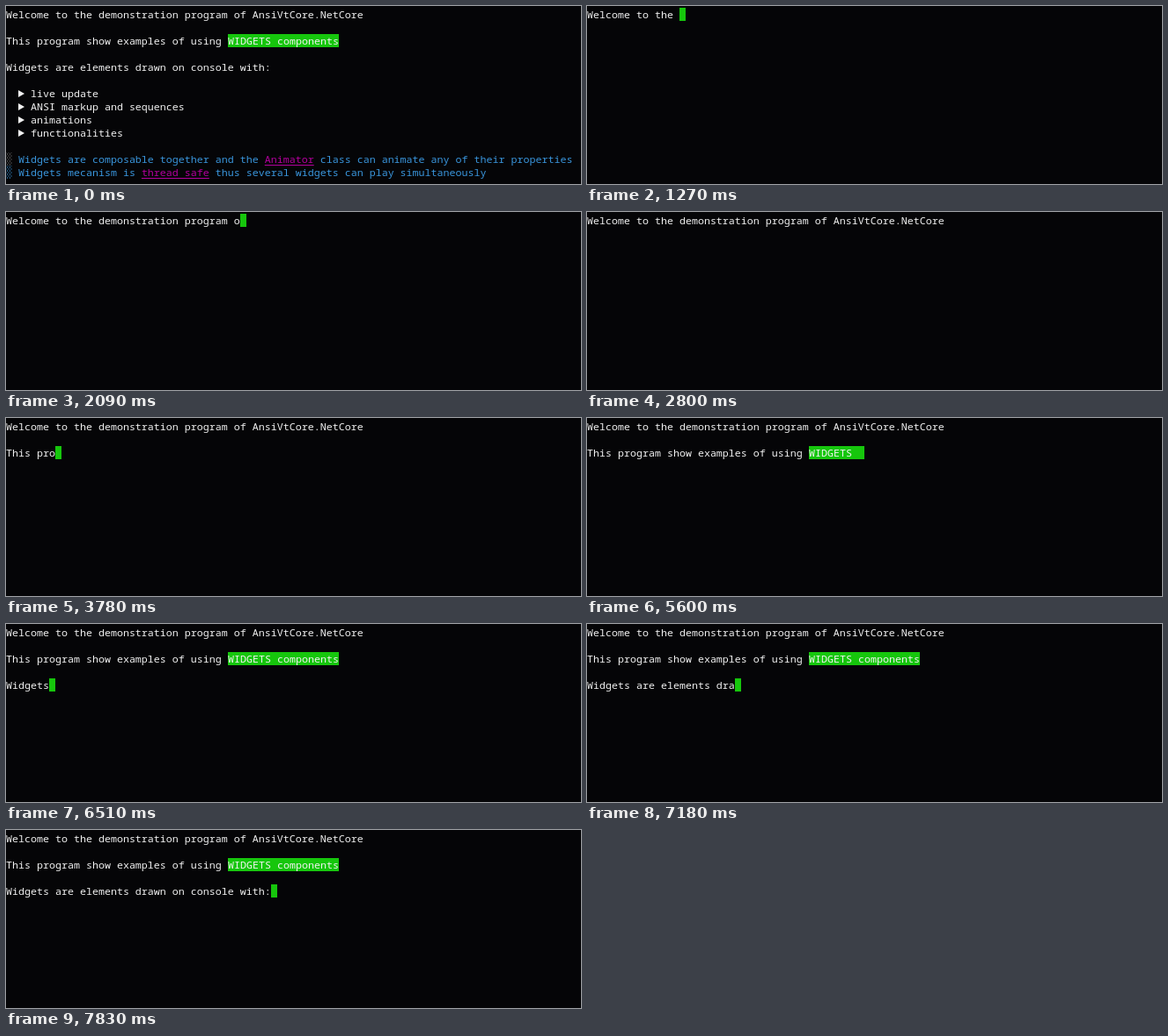
Recreate the animation shown at these times as an HTML page. Size 653 by 203 pixels, loop 8000 ms.

```html
<!DOCTYPE html>
<html lang="en">
<head>
<meta charset="utf-8">
<title>Console widgets demo</title>
<style>
  html, body { margin: 0; width: 100%; height: 100%; overflow: hidden; background: #050507; }
  #screen {
    position: absolute; left: 0; top: 0; width: 653px; height: 203px; overflow: hidden;
    background: #050507; color: #f2f2f2;
    /* 0.6em advance: exactly 7px per cell */
    font: 11.6667px/15px "Noto Sans Mono", "DejaVu Sans Mono", monospace;
    font-variant-ligatures: none;
  }
  .row { position: absolute; left: 0; height: 15px; white-space: pre; }
  .hot { position: absolute; top: 0; height: 15px; background: #16c60c; }
  #cursor { position: absolute; width: 7px; height: 15px; background: #16c60c; }
  .bullet {
    position: absolute; left: 14px; top: 4px; width: 7px; height: 8px;
    background: #f2f2f2; clip-path: polygon(0 0, 100% 50%, 0 100%);
  }
  .note { color: #3a96dd; }
  .note u {
    color: #b4009e; text-decoration: underline 1px;
    text-underline-offset: 2px; text-decoration-skip-ink: none;
  }
  .shade {
    position: absolute; left: 0; top: 0; width: 7px; height: 15px; opacity: .6;
    background:
      radial-gradient(circle, currentColor 0 .6px, transparent .7px) 0 0 / 3px 4px,
      radial-gradient(circle, currentColor 0 .6px, transparent .7px) 1.5px 2px / 3px 4px;
  }
</style>
</head>
<body>
<div id="screen"><div id="intro"></div><div id="cursor"></div></div>
<script>
const LOOP = 8000, CLEAR = 250, CELL = 7, LINE = 15, TOP = 2;
const screen = document.getElementById('screen');
const intro = document.getElementById('intro');
const cursor = document.getElementById('cursor');
const rowTop = row => TOP + row * LINE + 'px';

function addRow(parent, row, html = '', cls = '') {
  const el = document.createElement('div');
  el.className = 'row ' + cls;
  el.style.top = rowTop(row);
  el.innerHTML = html;
  parent.append(el);
  return el;
}

['live update', 'ANSI markup and sequences', 'animations', 'functionalities']
  .forEach((s, i) => addRow(intro, 6 + i, `<i class="bullet"></i>    ${s}`));

const shade = color => `<i class="shade" style="color:${color}"></i>  `;
addRow(intro, 11, shade('#767676') +
  'Widgets are composable together and the <u>Animator</u> class can animate any of their properties', 'note');
addRow(intro, 12, shade('#3a96dd') +
  'Widgets mecanism is <u>thread safe</u> thus several widgets can play simultaneously', 'note');

// keys: [time in ms, characters typed]; on/off: cursor visibility
const lines = [
  { row: 0, text: 'Welcome to the demonstration program of AnsiVtCore.NetCore', hot: '',
    on: 580, off: 2800,
    keys: [[580, 0], [760, 1], [1270, 15], [1540, 24], [1620, 25], [2400, 47], [2440, 48], [2800, 58]] },
  { row: 2, text: 'This program show examples of using ', hot: 'WIDGETS components',
    on: 3350, off: 6110,
    keys: [[3350, 0], [3510, 1], [4290, 23], [4350, 24], [4770, 36], [5320, 37], [6000, 54]] },
  { row: 4, text: 'Widgets are elements drawn on console with:', hot: '',
    on: 6110, off: LOOP,
    keys: [[6110, 0], [6300, 1], [6510, 7], [7090, 22], [7120, 23], [7830, 43]] }
];

for (const line of lines) {
  line.plain = addRow(screen, line.row);
  line.mark = addRow(screen, line.row, '', 'hot');
  line.mark.style.top = rowTop(line.row);
  line.mark.style.left = line.text.length * CELL + 'px';
}

function typed(keys, t) {
  const next = keys.findIndex(k => k[0] > t);
  if (next === 0) return 0;
  if (next < 0) return keys[keys.length - 1][1];
  const [t0, n0] = keys[next - 1], [t1, n1] = keys[next];
  return Math.floor(n0 + (n1 - n0) * (t - t0) / (t1 - t0) + 1e-6);
}

function setText(el, s) {
  if (el.textContent !== s) el.textContent = s;
}

function render(t) {
  const full = t < CLEAR;
  intro.style.display = full ? '' : 'none';
  cursor.style.display = 'none';
  for (const { row, text, hot, on, off, keys, plain, mark } of lines) {
    const n = full ? text.length + hot.length : typed(keys, t);
    setText(plain, text.slice(0, n));
    setText(mark, hot.slice(0, Math.max(0, n - text.length)));
    if (t >= on && t < off) {
      cursor.style.display = '';
      cursor.style.left = n * CELL + 'px';
      cursor.style.top = rowTop(row);
    }
  }
}

const start = performance.now();
function tick() {
  render((performance.now() - start) % LOOP);
  requestAnimationFrame(tick);
}
tick();
</script>
</body>
</html>
```
